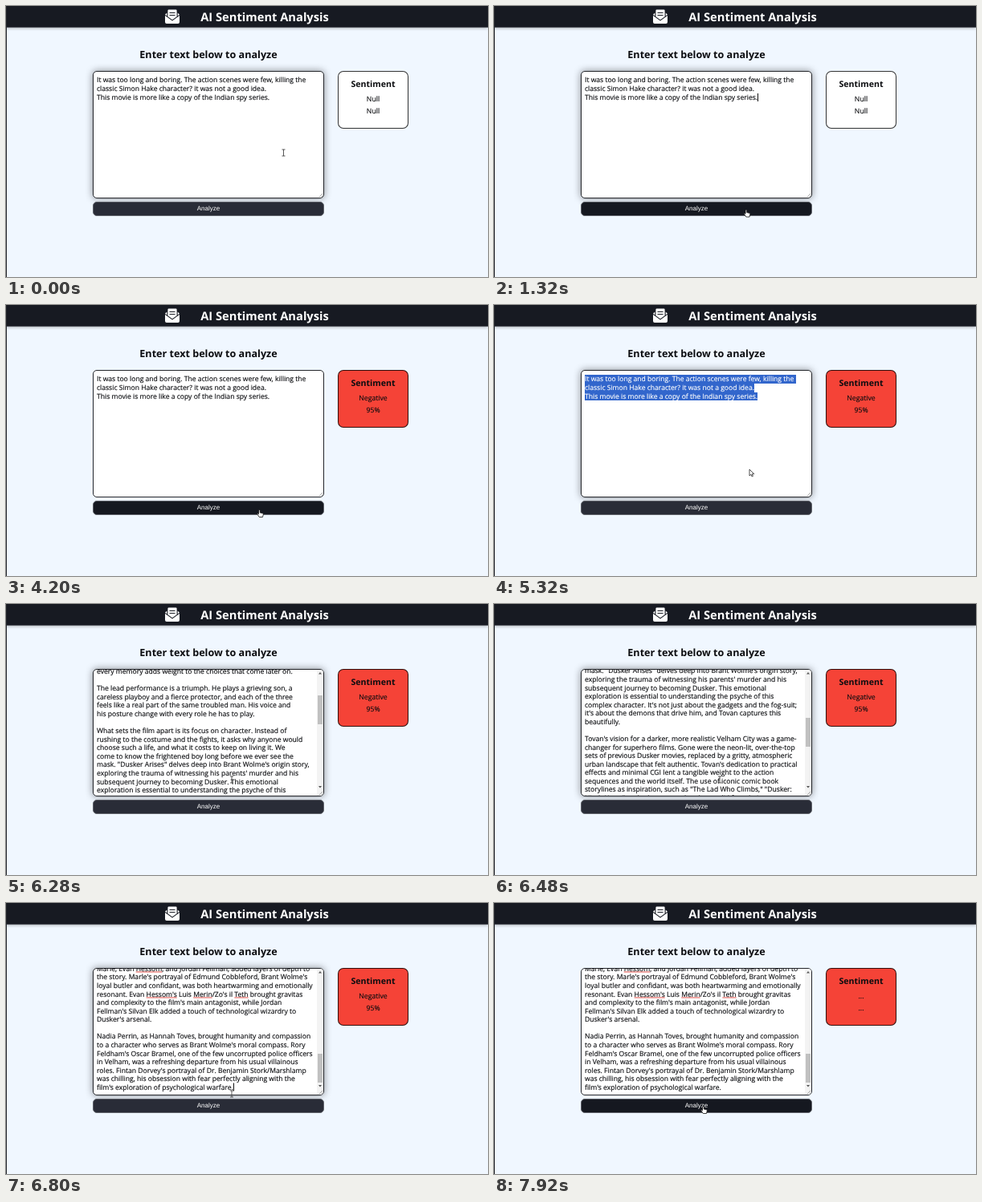
Animation, 600 px wide and 338 px high, one loop 8000 ms. Source, as an HTML page:

```html
<!DOCTYPE html>
<html lang="en">
<head>
<meta charset="utf-8">
<title>AI Sentiment Analysis</title>
<style>
html, body { margin: 0; width: 100%; height: 100%; overflow: hidden; background: #f0f7ff; }
body { position: relative; font: 8.7px/20px 'Open Sans', sans-serif; color: #0c0d10; text-rendering: geometricPrecision; }
body * { box-sizing: border-box; }
header, p, svg, #box, #lines, #bar, #thumb, #card, #button, #edge { position: absolute; margin: 0; }
header { left: 0; top: 0; width: 100%; height: 27px; background: #171a22; border-bottom: 1px solid #4a4d55; box-shadow: 0 0 4px rgba(0,0,0,.45); }
#edge { left: 0; top: 0; width: 1px; height: 100%; background: #22252b; }
p { width: 300px; text-align: center; white-space: pre; }
b { font-weight: 700; }
#box { left: 108px; top: 81px; width: 288px; height: 159px; border: 1px solid #23252a; border-radius: 5px; background: #fff; overflow: hidden; }
#box.focus { box-shadow: 0 0 10px rgba(0,0,0,.45); }
#lines { left: 4px; top: 5.4px; font-size: 8.58px; line-height: 10.58px; white-space: pre; }
#lines, #label, #score { -webkit-text-stroke: .15px; }
#lines div { width: fit-content; height: 10.58px; }
#lines.selected div { background: #3266cc; color: #fff; }
#lines u { text-decoration: underline .8px #e2504a; text-underline-offset: 1px; }
#lines i { display: inline-block; width: 1px; height: 10px; margin-right: -1px; vertical-align: -2px; background: #111; }
#bar { left: 278px; top: 0; width: 8px; height: 157px; background: #f3f3f3; }
#thumb { left: 1px; width: 6px; height: 36px; background: #c1c1c1; }
#card { left: 413px; top: 81px; width: 88px; height: 72px; border: 1px solid rgba(0,0,0,.8); border-radius: 7px; background: #fff; }
#button { left: 108px; top: 244px; width: 288px; height: 18px; border: 1px solid #62656c; border-radius: 5px; background: #292c37;
  color: #fff; font: 8px/16px 'Liberation Sans', Arial, sans-serif; text-align: center; }
#button.hover { background: #151820; }
svg { left: 0; top: 0; }
</style>
</head>
<body>
<header></header>
<p style="left:172px;top:4px;font-size:14.7px;color:#fff"><b>AI Sentiment Analysis</b></p>
<p style="left:102px;top:51px;font-size:12.6px"><b>Enter text below to analyze</b></p>
<div id="box">
  <div id="lines"></div>
  <div id="bar"><div id="thumb"></div></div>
</div>
<div id="button">Analyze</div>
<div id="card"></div>
<p style="left:307px;top:88px;font-size:10.6px"><b>Sentiment</b></p>
<p id="label" style="left:307px;top:105.6px"></p>
<p id="score" style="left:307px;top:120.6px"></p>
<div id="edge"></div>
<svg width="600" height="338" fill="none">
  <g fill="#fff">
    <path d="M202.600 4.500h8.800q1.200 0 1.200 1.200v7.500l-5.600 4-5.600-4v-7.500q0-1.200 1.200-1.200z"/>
    <path d="M200.300 8.600v3.800l-2.300-1.700zM213.700 8.600v3.800l2.300-1.700z"/>
    <path d="M198 12l9 6.500 9-6.500v8q0 2-2 2h-14q-2 0-2-2z"/>
  </g>
  <path d="M203.500 8.500h7M203.500 11.500h7" stroke="#171a22" stroke-width="1.200"/>
  <path d="M390 238l4-4M392.500 238l1.500-1.500" stroke="#888" stroke-width=".7"/>
  <path id="arrows" d="M389 87.500l2-2.500 2 2.500zM389 227l2 2.500 2-2.500z" fill="#555"/>
  <g id="mouse">
    <path id="beam" d="M-2-4h4M0-4v8M-2 4h4" stroke="#444" stroke-width=".9"/>
    <path id="arrow" d="M-1-4v8l1.900-1.700 1.200 2.700 1.300-.6-1.200-2.600h2.600z" fill="#fff" stroke="#222" stroke-width=".8"/>
    <path id="hand" d="M-2-4q.9-1 1.700 0v3l3.300.8q.9.300.8 1.300l-.8 3.400h-4.200l-2.600-3.700q0-1 1-.7l.8.7z" fill="#fff" stroke="#111" stroke-width=".8"/>
  </g>
</svg>
<script>
const $ = id => document.getElementById(id);

const shortText = `It was too long and boring. The action scenes were few, killing the${' '}
classic Simon Hake character? it was not a good idea.
This movie is more like a copy of the Indian spy series.`;

const longText = `Every so often a superhero film comes along that changes what
we expect from the genre, and this one does so from its very
first scene. It is a patient and thoughtful origin story that
takes its hero seriously and trusts the audience to follow.

The film opens far from home, in a cold prison at the edge of
the world, and slowly pieces together the road that led there.
The story moves between past and present with confidence, and
every memory adds weight to the choices that come later on.

The lead performance is a triumph. He plays a grieving son, a
careless playboy and a fierce protector, and each of the three
feels like a real part of the same troubled man. His voice and
his posture change with every role he has to play.

What sets the film apart is its focus on character. Instead of
rushing to the costume and the fights, it asks why anyone would
choose such a life, and what it costs to keep on living it. We
come to know the frightened boy long before we ever see the
mask. "Dusker Arises" delves deep into Brant Wolme's origin story,
exploring the trauma of witnessing his parents' murder and his
subsequent journey to becoming Dusker. This emotional
exploration is essential to understanding the psyche of this
complex character. It's not just about the gadgets and the fog-suit;
it's about the demons that drive him, and Tovan captures this
beautifully.

Tovan's vision for a darker, more realistic Velham City was a game-
changer for superhero films. Gone were the neon-lit, over-the-top
sets of previous Dusker movies, replaced by a gritty, atmospheric
urban landscape that felt authentic. Tovan's dedication to practical
effects and minimal CGI lent a tangible weight to the action
sequences and the world itself. The use of iconic comic book
storylines as inspiration, such as "The Lad Who Climbs," "Dusker:
Ninth Hour," and others, gave the plot a solid foundation.

The supporting cast was equally impressive. The veterans
Marle, Evan <u>Hessom</u>, and Jordan Fellman, added layers of depth to
the story. Marle's portrayal of Edmund Cobbleford, Brant Wolme's
loyal butler and confidant, was both heartwarming and emotionally
resonant. Evan <u>Hessom's</u> Luis <u>Merin</u>/Zo's il <u>Teth</u> brought gravitas
and complexity to the film's main antagonist, while Jordan
Fellman's Silvan Elk added a touch of technological wizardry to
Dusker's arsenal.

Nadia Perrin, as Hannah Toves, brought humanity and compassion
to a character who serves as Brant Wolme's moral compass. Rory
Feldham's Oscar Bramel, one of the few uncorrupted police officers
in Velham, was a refreshing departure from his usual villainous
roles. Fintan Dorvey's portrayal of Dr. Benjamin Stork/Marshlamp
was chilling, his obsession with fear perfectly aligning with the
film's exploration of psychological warfare.`;

const LOOP = 8000, CLICK = 1560, RESULT = 4200, FOCUS = 4800, SELECT = 5040, PASTE = 6000, CLICK2 = 7080;
const SCROLL_END = 402.5, BLINK = 280;

// [time, x, y]
const mousePath = [[920, 345.5, 183], [1280, 315, 258.5], [1640, 316.5, 260], [4360, 316.5, 260],
  [4760, 319, 209], [6000, 319, 209], [6240, 281, 219], [6480, 281, 219], [6760, 281, 238], [6840, 281, 238], [7060, 261.5, 258]];
const scrollPath = [[6120, 0], [6480, 209], [6800, SCROLL_END]];

const smooth = u => u * u * (3 - 2 * u);

function along(keys, t, ease = u => u) {
  const next = keys.findIndex(k => k[0] > t);
  if (next < 0) return keys.at(-1).slice(1);
  if (next === 0) return keys[0].slice(1);
  const a = keys[next - 1], b = keys[next];
  const u = ease((t - a[0]) / (b[0] - a[0]));
  return a.slice(1).map((v, i) => v + (b[i + 1] - v) * u);
}

function caretOn(t) {
  const [start, end] = t < CLICK ? [80, CLICK] : t < SELECT ? [FOCUS, SELECT] : [PASTE, CLICK2];
  return t >= start && t < end && Math.floor((t - start) / BLINK) % 2 === 0;
}

const show = (id, on) => $(id).style.display = on ? '' : 'none';
let shown = '';

function setText(text) {
  if (text === shown) return;
  shown = text;
  $('lines').innerHTML = text.split('\n').map(s => `<div>${s}</div>`).join('');
  $('lines').lastChild.insertAdjacentHTML('beforeend', '<i id="caret"></i>');
}

function draw(t) {
  const pasted = t >= PASTE;
  setText(pasted ? longText : shortText);
  $('lines').className = t >= SELECT && !pasted ? 'selected' : '';
  $('box').className = t < CLICK || (t >= FOCUS && t < CLICK2) ? 'focus' : '';
  $('caret').style.visibility = caretOn(t) ? 'visible' : 'hidden';

  const [scroll] = along(scrollPath, t);
  $('lines').style.transform = `translateY(${-scroll}px)`;
  $('thumb').style.top = 9 + 97 * scroll / SCROLL_END + 'px';
  show('bar', pasted);
  show('arrows', pasted);

  const waiting = (t >= CLICK && t < RESULT) || t >= CLICK2;
  const rated = t >= RESULT;
  $('card').style.background = rated ? '#f54337' : '#fff';
  $('label').textContent = waiting ? '...' : rated ? 'Negative' : 'Null';
  $('score').textContent = waiting ? '...' : rated ? '95%' : 'Null';

  const [x, y] = along(mousePath, t, smooth);
  const hover = y > 247, idle = t >= 5320 && !pasted;
  $('mouse').setAttribute('transform', `translate(${x} ${y})`);
  $('button').className = hover ? 'hover' : '';
  show('hand', hover);
  show('arrow', idle);
  show('beam', !hover && !idle);
}

function tick() {
  draw(performance.now() % LOOP);
  requestAnimationFrame(tick);
}
tick();
</script>
</body>
</html>
```
